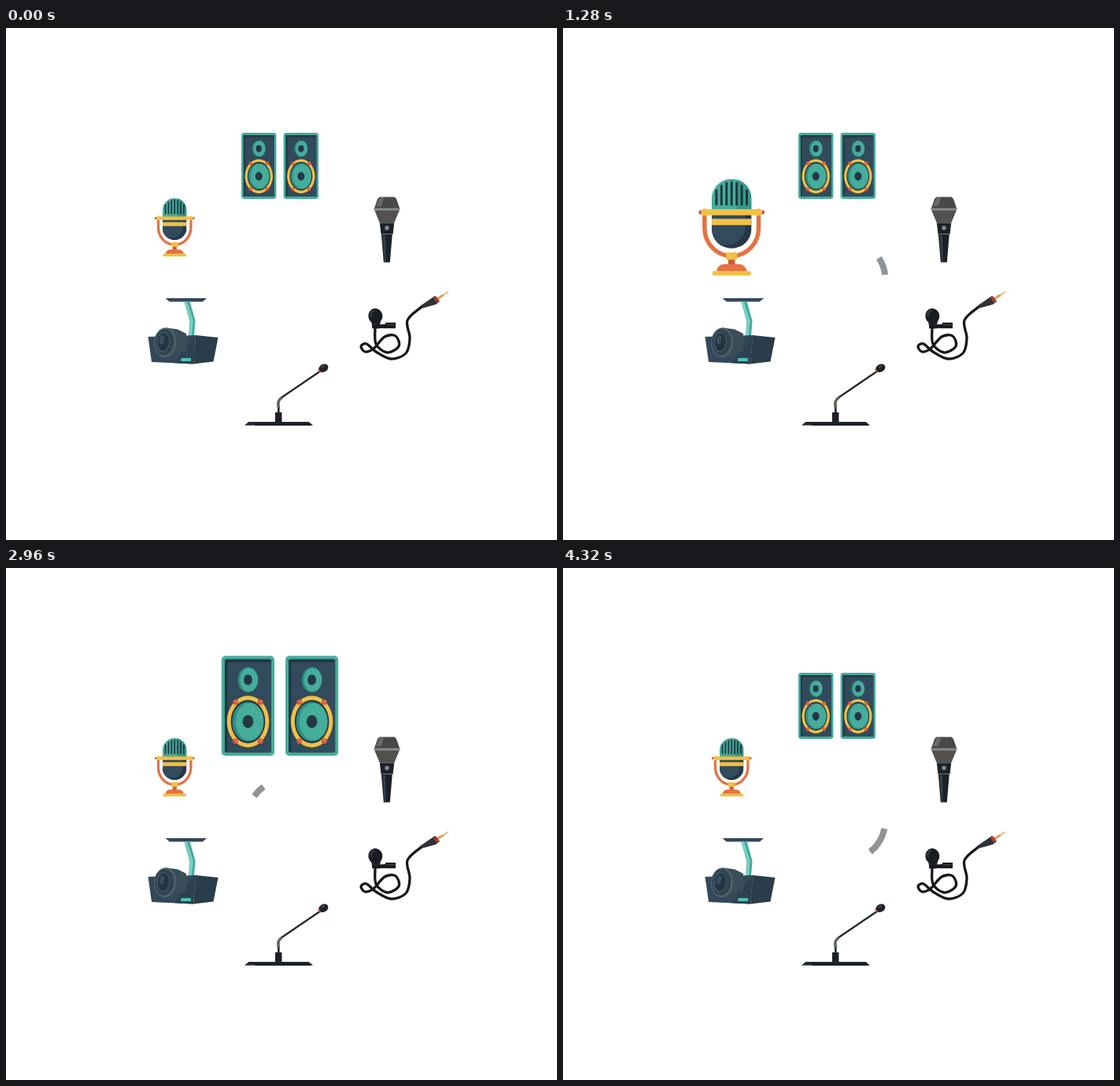
Write an HTML page with a canvas that moves like this. It is 700x650 px and loops after 4360 ms.

```html
<!DOCTYPE html>
<html lang="en">
<head>
<meta charset="utf-8">
<title>Sound equipment wheel</title>
<style>
html, body { margin: 0; width: 100%; height: 100%; overflow: hidden; background: #fff; }
canvas { display: block; }
</style>
</head>
<body>
<canvas id="stage" width="700" height="650"></canvas>
<script>
const ctx = document.getElementById('stage').getContext('2d');
const LOOP = 4360, STEP = 40, SLOT = 240, PEAK = 124, LAP = 3600;
const TEAL = '#45ad9b', TEAL_DARK = '#2f8c80', NAVY = '#314b5c', NAVY_DARK = '#243746';
const YELLOW = '#f1c046', ORANGE = '#e47244', RED = '#d2573c', INK = '#1c2127';

function poly(color, ...p) {
  ctx.fillStyle = color;
  ctx.beginPath();
  for (let i = 0; i < p.length; i += 2) ctx.lineTo(p[i], p[i + 1]);
  ctx.closePath();
  ctx.fill();
}
// Symmetric trapezoid: half width a at y0, half width b at y1
function taper(color, x, y0, a, y1, b) {
  poly(color, x - a, y0, x + a, y0, x + b, y1, x - b, y1);
}
function oval(color, x, y, rx, ry = rx, turn = 0) {
  ctx.fillStyle = color;
  ctx.beginPath();
  ctx.ellipse(x, y, rx, ry, turn, 0, Math.PI * 2);
  ctx.fill();
}
function box(color, x, y, w, h, r = 0) {
  ctx.fillStyle = color;
  ctx.beginPath();
  ctx.roundRect(x, y, w, h, r);
  ctx.fill();
}
// Box centred on x
function bar(color, x, y, w, h, r) {
  box(color, x - w / 2, y, w, h, r);
}
function line(color, width, d) {
  ctx.strokeStyle = color;
  ctx.lineWidth = width;
  ctx.stroke(new Path2D(d));
}
// Smooth curve through the points of a string "x,y x,y ..."
function cord(color, width, text) {
  const p = text.split(' ').map(s => s.split(',').map(Number));
  const at = i => p[Math.max(0, Math.min(p.length - 1, i))];
  const bend = (i, k, side) => at(i)[k] + side * (at(i + 1)[k] - at(i - 1)[k]) / 6;
  ctx.strokeStyle = color;
  ctx.lineWidth = width;
  ctx.beginPath();
  ctx.moveTo(...p[0]);
  for (let i = 1; i < p.length; i++) {
    ctx.bezierCurveTo(bend(i - 1, 0, 1), bend(i - 1, 1, 1), bend(i, 0, -1), bend(i, 1, -1), ...p[i]);
  }
  ctx.stroke();
}
// Scale about (x, y), with that point landing on (tx, ty)
function scaled(s, x, y, tx, ty, draw) {
  ctx.save();
  ctx.translate(tx, ty);
  ctx.scale(s, s);
  ctx.translate(-x, -y);
  draw();
  ctx.restore();
}

function cone(y, r) {
  oval(TEAL_DARK, 0, y, r, r * 1.25);
  oval(TEAL, r * 0.1, y, r * 0.89, r * 1.18);
  oval(NAVY_DARK, 0, y, 3 + r * 0.19, 4 + r * 0.21);
}
function speaker() {
  bar(TEAL, 0, -63.3, 67, 126.6, 5);
  bar(NAVY_DARK, 0, -59, 59, 118, 2);
  box(NAVY, -26, -55, 55.5, 114, 1);
  cone(-33, 12.7);
  oval(YELLOW, 0, 20, 26.7, 32.7);
  oval(NAVY_DARK, 0, 20, 21.8, 27.5);
  cone(20, 20);
  for (const x of [-1, 1]) for (const y of [-1, 1]) {
    oval(RED, x * 15.7, 20 + y * 24.7, 3.5);
    oval(ORANGE, x * 15.7 + 0.7, 19.5 + y * 24.7, 2);
  }
}
function speakers() {
  for (const side of [-1, 1]) scaled(1 / 1.51, 0, 0, 348 + side * 26.8, 175, speaker);
}

function handheld() {
  taper('#494846', 484, 214.5, 9.5, 217, 12);
  taper('#494846', 484, 217, 12, 230, 16.5);
  poly('#6b6a67', 475, 215.5, 480, 215.5, 477, 226, 470, 226);
  taper('#53504d', 484, 231, 16, 247.5, 9.2);
  bar('#85888a', 484, 228.8, 33, 3, 1);
  taper(INK, 484, 247.5, 9.2, 262, 7.5);
  oval('#7f8a92', 484, 253.7, 2.8);
  taper(INK, 483.8, 261.5, 7, 297.5, 4);
  poly('#34414d', 478.5, 263, 482, 263, 482.5, 297, 481, 297);
  bar('#767b7f', 484, 261, 15, 1);
}

function lavalier() {
  cord('#171717', 3.3, '469,380 470,401 484,412 499,404 495,391 481,392 467,407 ' +
    '456,411 451,404 458,401 470,411 489,420 508,413 513,394 510,371 528,354');
  line('#dca05f', 2.8, 'M547 344.5L556 338.8');
  line('#e9bd83', 2, 'M556 338.8L562 335');
  poly('#303238', 526, 353, 545, 340, 551, 347, 546, 351, 528, 356);
  line('#a93f32', 4, 'M544.5 341.5L549 347.5');
  taper('#24292e', 470, 372, 6, 381.5, 4.5);
  oval('#191c21', 469.3, 365.7, 9, 9.8, -0.15);
  oval('#303c47', 466, 362.5, 3.3, 5, 0.45);
  oval('#191c21', 467.8, 363.5, 2.8, 4.3, 0.45);
  poly('#17191c', 465, 377, 482, 376, 482, 374, 495, 374, 495, 381.3, 482, 381.3, 465, 381);
  box('#383c40', 483, 376, 11, 1.5);
}

function deskMic() {
  taper('#20272e', 346.5, 500, 38.2, 504.6, 43.5);
  bar('#0f1316', 352, 502.7, 71, 1.9);
  bar(INK, 346.2, 488, 8.5, 12.5);
  bar(INK, 346.3, 481, 2.6, 8);
  line('#23282f', 2.3, 'M349.5 469.5L398 436.5');
  line('#62645f', 3.7, 'M346.3 482C345 475 346 472 350.5 469.2');
  oval(INK, 403.3, 431.8, 6.4, 4.9, -0.5);
  oval('#39434c', 402.8, 429.8, 3, 1.4, -0.5);
  line('#bd4633', 2, 'M397 433L399.6 437.4');
}

function projector() {
  taper('#32485a', 228.8, 343, 26.2, 347.5, 21);
  line('#47ab9c', 7, 'M230 347.5L237 372L235.5 391');
  line('#79d2c3', 3.5, 'M228 347.5L236 372L234 391');
  poly('#33485a', 180.5, 392, 241, 390, 238, 426.5, 185, 424);
  poly('#2a3d4a', 241, 390, 269.5, 393, 263.5, 423.5, 238, 426.5);
  poly('#2d424f', 241, 390, 238, 426.5, 214, 425.3);
  poly('#3a4e5a', 203, 380.5, 218, 382.5, 229, 388, 229, 410, 205, 418);
  oval('#4b626c', 202, 399.3, 14, 18.9, 0.08);
  oval('#30434f', 201.3, 399, 12, 16.5, 0.08);
  oval('#4c6672', 199.6, 398.7, 8.2, 12.8, 0.08);
  oval('#223542', 199.8, 398.7, 7.2, 11.7, 0.08);
  oval('#35505f', 198, 396, 3, 6, 0.2);
  taper('#50c2b3', 228.6, 419, 6.2, 423, 6.5);
}

// Drawn large, centred on x = 0
function vintageMic() {
  line(ORANGE, 5.6, 'M-35.2 236V254A35.2 36.5 0 0 0 35.2 254V236');
  ctx.save();
  ctx.beginPath();
  ctx.roundRect(-26, 190, 52, 90.5, 26);
  ctx.clip();
  bar(TEAL, 0, 190, 52, 40);
  box('#389888', 7, 190, 19, 40);
  for (let i = -3; i <= 3; i++) {
    const top = 193 + i * i * 1.2;
    bar('#20343f', i * 6.6, top, 3, 224.5 - top);
  }
  bar(NAVY_DARK, 0, 230, 52, 51);
  box(NAVY, -26, 230, 44, 46, [0, 0, 24, 0]);
  bar(YELLOW, 0, 242, 52, 8.3);
  ctx.restore();
  bar(RED, 0, 231, 85.8, 5, 1.5);
  bar(YELLOW, 0, 229.5, 70.4, 7.8);
  for (const side of [-1, 1]) oval(YELLOW, side * 35, 233.4, 4.8);
  bar(RED, 0, 294, 8.8, 10);
  bar(YELLOW, 0, 285.5, 14.4, 9.7, 1.5);
  bar(ORANGE, 0, 301, 39.5, 10, [12, 12, 0, 0]);
  bar(YELLOW, 0, 310, 50.4, 5.8, 2);
}
function studioMic() {
  scaled(1 / 1.7, 0, 253, 214.2, 253, vintageMic);
}

// Draw routine, pivot and growth at the top of the pulse, in order of turn
const items = [
  [speakers, 348, 175, 0.61],
  [handheld, 484, 256, 0.75],
  [lavalier, 512, 396, 0.74],
  [deskMic, 390, 452, 0.5],
  [projector, 225.2, 395, 0.5],
  [studioMic, 214.2, 253, 0.78]
];

// Steep ease from 0 to 1 as the share of a against b grows
function ease(a, b) {
  return a ** 2.8 / (a ** 2.8 + b ** 2.8);
}

function pulse(ms) {
  const x = ms < PEAK ? ms / PEAK : (SLOT - ms) / (SLOT - PEAK);
  return ease(x, 1 - x);
}

// A slow lap of the ring, then the start of a faster one
function ring(t) {
  let from, to;
  if (t < LAP) {
    const u = t / LAP;
    from = 360 * (0.42 * u + 0.58 * ease(u, 2.35 * (1 - u)));
    to = from + 31 * Math.sin(Math.PI * u ** 1.15);
  } else {
    const u = (t - LAP) / 720;
    from = 102 * u ** 1.7;
    to = 141 * u ** 1.5;
  }
  if (to <= from) return;
  const rad = a => (a - 90) * Math.PI / 180;
  ctx.strokeStyle = '#919497';
  ctx.lineWidth = 8;
  ctx.beginPath();
  ctx.arc(357.6, 320, 52, rad(from), rad(to));
  ctx.stroke();
}

function render(t) {
  ctx.fillStyle = '#fff';
  ctx.fillRect(0, 0, 700, 650);
  ring(t);
  const active = Math.floor(t / SLOT) % items.length;
  items.forEach(([draw, x, y, grow], i) => {
    const s = i === active ? 1 + grow * pulse(t % SLOT) : 1;
    scaled(s, x, y, x, y, draw);
  });
}

const begin = performance.now();
function tick() {
  const t = (performance.now() - begin) % LOOP;
  render(Math.floor(t / STEP) * STEP);
  requestAnimationFrame(tick);
}
tick();
</script>
</body>
</html>
```
